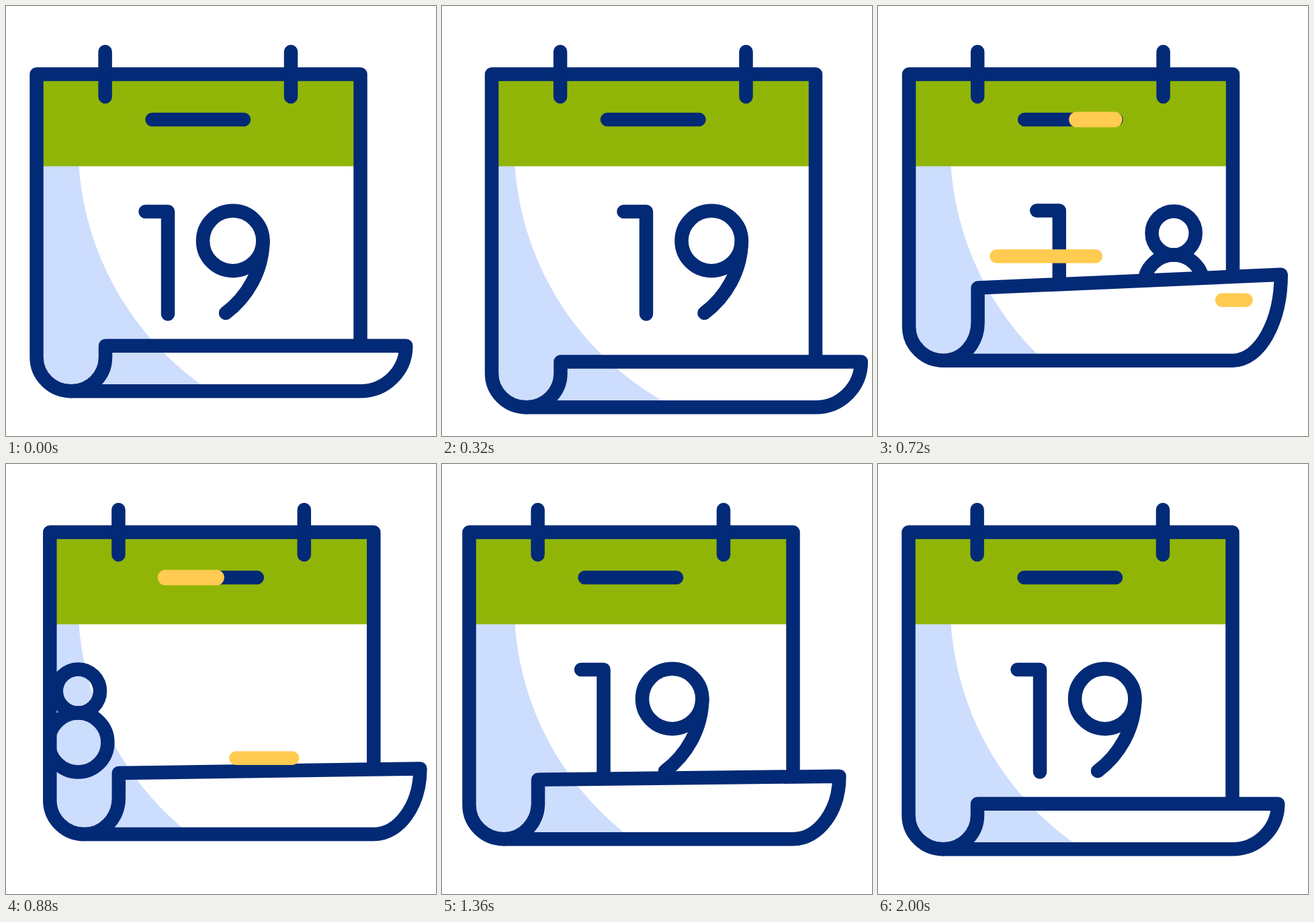
Recreate the animation shown at these times as an HTML page. Size 640x640 px, loop 2.88 s.

```html
<!DOCTYPE html>
<html lang="en">
<head>
<meta charset="utf-8">
<title>Calendar</title>
<style>
  html, body { margin: 0; width: 100%; height: 100%; overflow: hidden; background: #fff; }
  svg { display: block; width: 100%; height: 100%; }
  .ink { fill: none; stroke: #032a76; stroke-width: 20.5; stroke-linecap: round; stroke-linejoin: round; }
  .streak { stroke: #ffcb50; stroke-width: 20.5; stroke-linecap: round; }
</style>
</head>
<body>
<svg viewBox="0 0 640 640">
  <defs>
    <clipPath id="bodyClip"><path id="bodyShape"/></clipPath>
    <clipPath id="foldClip"><path id="foldShape"/></clipPath>
    <path id="oneShape" d="M207.5 306H241V458.5"/>
  </defs>
  <g id="calendar">
    <g clip-path="url(#bodyClip)">
      <rect width="640" height="640" fill="#cdddfd"/>
      <circle class="light" cy="207.6" r="437.3" fill="#fff"/>
      <rect x="45" y="101" width="483" height="137.5" fill="#91b507"/>
      <g class="ink">
        <use id="one" href="#oneShape"/>
        <g id="nine">
          <circle cx="337.7" cy="349.5" r="44.7"/>
          <path d="M382.4 349.5C382 395 358 434 327 457"/>
        </g>
        <use id="passingOne" href="#oneShape"/>
        <g id="passingEight">
          <circle cy="338" r="32.6"/>
          <circle cy="414.5" r="44"/>
        </g>
      </g>
    </g>
    <path id="frame" class="ink"/>
    <path class="ink" d="M147.6 68V135M424 68V135M217.5 169H354"/>
    <g clip-path="url(#foldClip)">
      <rect width="700" height="640" fill="#cdddfd"/>
      <circle class="light" cy="207.6" r="437.3" fill="#fff"/>
    </g>
    <path id="foldLine" class="ink"/>
    <g id="streaks"></g>
  </g>
</svg>
<script>
const LOOP = 2880, STEP = 40;
const $ = id => document.getElementById(id);
const clamp = v => Math.max(0, Math.min(1, v));
const mix = (a, b, u) => a + (b - a) * u;
const smooth = u => u * u * (3 - 2 * u);
const shift = (id, x, y = 0) => $(id).setAttribute('transform', `translate(${x} ${y})`);

// Eased value between [time, value] keys.
function track(t, keys) {
  const i = keys.findIndex(k => k[0] > t);
  if (i < 0) return keys[keys.length - 1][1];
  if (i === 0) return keys[0][1];
  const [t0, v0] = keys[i - 1], [t1, v1] = keys[i];
  return mix(v0, v1, smooth((t - t0) / (t1 - t0)));
}

const sway = [[0, 0], [270, 33], [565, -26], [850, 21], [1118, -14], [1524, 0]];
const drop = [[0, 0], [300, 24.5], [700, -46], [1100, 10], [1500, -25], [1980, 0]];
const curl = [[300, 0], [700, 41], [1100, 0], [1500, 29], [1980, 0]];

// Each streak is drawn by its head and erased by its tail.
const streaks = [
  { y: 169, width: 23, from: 351.5, to: 217.5, head: [640, 830], tail: [720, 1090] },
  { y: 372.5, from: 500, to: 176, head: [540, 720], tail: [600, 820] },
  { y: 437.7, from: 547, to: 169, head: [690, 1010], tail: [720, 1150] }
];
for (const s of streaks) {
  s.line = document.createElementNS('http://www.w3.org/2000/svg', 'line');
  s.line.setAttribute('class', 'streak');
  if (s.width) s.line.style.strokeWidth = s.width;
  s.line.setAttribute('y1', s.y);
  s.line.setAttribute('y2', s.y);
  $('streaks').append(s.line);
}

function drawPage(t, dx) {
  const c = track(t, curl), tilt = c * c / 84;
  const base = 573.3 + track(t, drop);
  const left = base - 67.5 - c, tipY = left - tilt, tipX = 595.3 + tilt * 0.2;
  const bend = base - 50.5, foldBend = bend - c * 0.15;
  const right = mix(left, tipY, 0.85);

  $('bodyShape').setAttribute('d',
    `M45.5 101.5H527.5V${right}L148 ${left}V${foldBend}Q148 ${base} 97 ${base}A51.5 50.5 0 0 1 45.5 ${bend}Z`);
  $('frame').setAttribute('d',
    `M527.5 ${right}V101.5H45.5V${bend}A51.5 50.5 0 0 0 97 ${base}`);

  const fold = `M97 ${base}A51 ${base - foldBend} 0 0 0 148 ${foldBend}V${left}L${tipX} ${tipY}` +
    `C${tipX} ${mix(tipY, base, 0.552)} ${mix(527.5, tipX, 0.552)} ${base} 527.5 ${base}Z`;
  $('foldShape').setAttribute('d', fold);
  $('foldLine').setAttribute('d', fold);
  document.querySelectorAll('.light').forEach(el => el.setAttribute('cx', 544.7 - dx));
}

// Wind up to the right, rush off left, then glide back in from the right.
function digitOffset(t, delay, reach, end) {
  if (t >= 850) return reach * Math.max(0, (end - t) / (end - 1080)) ** 3;
  return track(t, [[0, 0], [300, 35]]) - 0.0053 * Math.max(0, t - 310 - delay) ** 2;
}

function drawDigits(t) {
  shift('one', digitOffset(t, 0, 117, 1503));
  shift('nine', digitOffset(t, 35, 152, 1549));
  const pass = 2.2 * (720 - t);
  shift('passingOne', 28.2 + pass, -1.5);
  shift('passingEight', 439.6 + pass);
}

function drawStreaks(t) {
  const along = (s, [a, b]) => mix(s.from, s.to, clamp((t - a) / (b - a)));
  for (const s of streaks) {
    s.line.setAttribute('x1', along(s, s.head));
    s.line.setAttribute('x2', along(s, s.tail));
    s.line.style.display = t > s.head[0] && t < s.tail[1] ? '' : 'none';
  }
}

function render(now) {
  const t = Math.floor(now % LOOP / STEP) * STEP;
  const dx = track(t, sway);
  shift('calendar', dx);
  drawPage(t, dx);
  drawDigits(t);
  drawStreaks(t);
}

const start = performance.now();
function tick() {
  render(performance.now() - start);
  requestAnimationFrame(tick);
}
tick();
</script>
</body>
</html>
```
